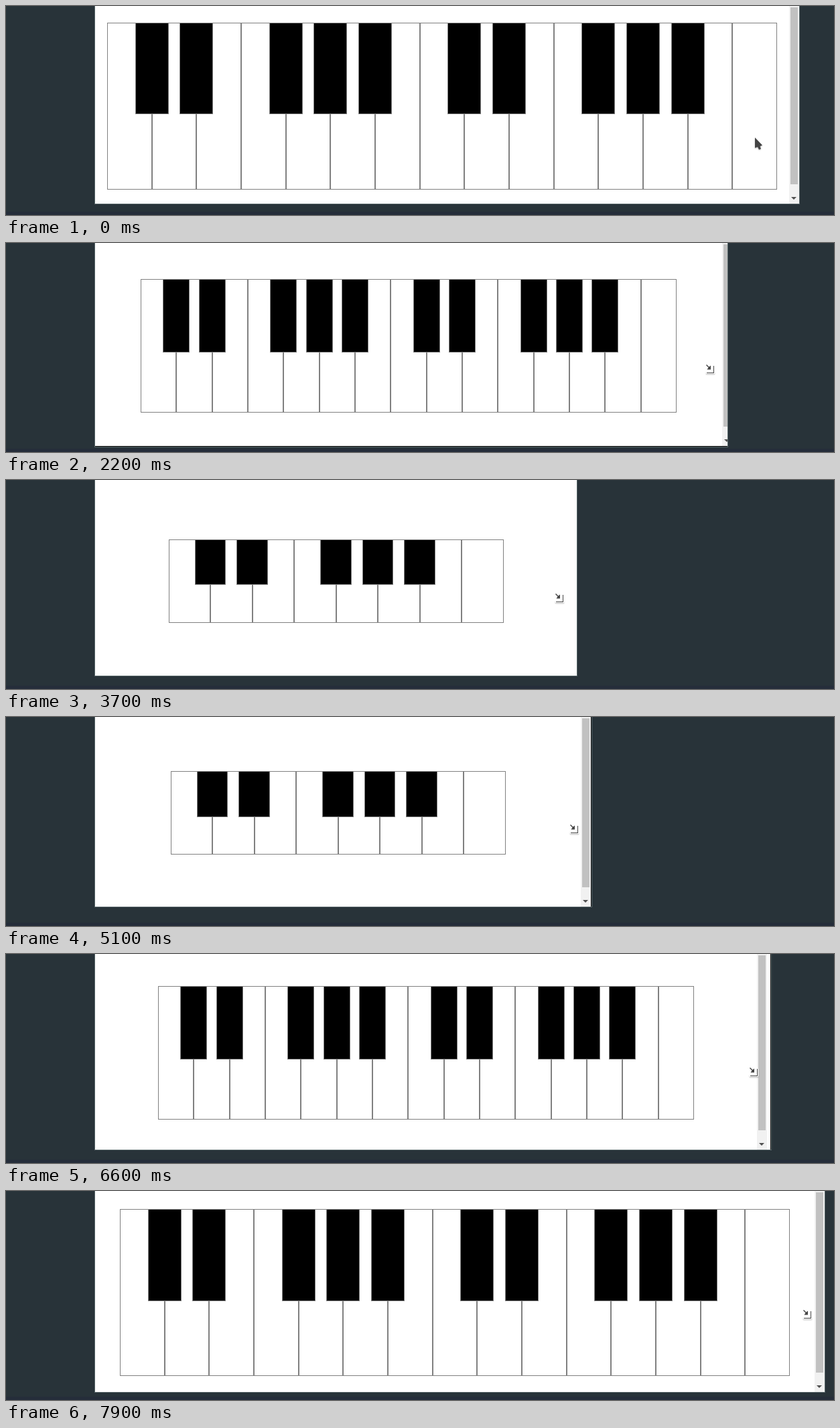
An HTML page with a canvas for the animation above (8000 ms loop, 1236 by 313 pixels).

```html
<!DOCTYPE html>
<html>
<head>
<meta charset="utf-8">
<title>Responsive piano</title>
<style>
html, body { margin: 0; width: 100%; height: 100%; overflow: hidden; background: #283339; }
canvas { display: block; }
</style>
</head>
<body>
<canvas id="stage" width="1236" height="313"></canvas>
<script>
const ctx = document.getElementById('stage').getContext('2d');
const LOOP = 8000, STEP = 100, REFLOW = 134, LEFT = 133, BAR = 15;

// Drag of the window corner: time, right, bottom
const drag = [
  [1290, 1184, 296], [2200, 1077, 305], [3000, 973, 303], [3600, 870, 300],
  [3700, 852, 293], [4100, 812, 290], [4500, 812, 290], [5100, 874, 284],
  [5400, 943, 285], [6030, 1038, 284], [6100, 1044, 284], [6960, 1213, 300],
  [7200, 1213, 300], [7400, 1224, 302], [7600, 1224, 302], [7700, 1222, 301]
];

// Pointer before the drag: time, x, y
const pointer = [[100, 1118, 197], [500, 1177, 195], [700, 1164, 187]];

function sample(track, t) {
  const i = track.findIndex(row => row[0] >= t);
  if (i <= 0) return track.at(i).slice(1);
  const [t0, ...from] = track[i - 1], [t1, ...to] = track[i];
  return from.map((v, j) => Math.round(v + (to[j] - v) * (t - t0) / (t1 - t0)));
}

function rect(color, x, y, w, h) {
  ctx.fillStyle = color;
  ctx.fillRect(x, y, w, h);
}

function polygon(color, points) {
  ctx.beginPath();
  points.forEach(([x, y]) => ctx.lineTo(x, y));
  ctx.closePath();
  ctx.fillStyle = color;
  ctx.fill();
}

function pianoKey(color, ...edges) {
  const [x0, x1, y0, y1] = edges.map(Math.round);
  rect('#808080', x0, y0, x1 - x0, y1 - y0);
  rect(color, x0 + 1, y0 + 1, x1 - x0 - 2, y1 - y0 - 2);
}

function piano(right, bottom) {
  const page = right - LEFT;
  const [width, keys] = page >= 1024 ? [1000, 15] : page >= 820 ? [800, 15] : [500, 8];
  const height = width / 4, step = width / keys;
  const x = (LEFT + right - BAR - width) / 2;
  const y = (bottom + 3 - height) / 2;
  for (let i = 0; i < keys; i++) {
    pianoKey('#fff', x + i * step, x + (i + 1) * step, y, y + height);
  }
  for (let i = 1; i < keys; i++) {
    if (i % 7 === 0 || i % 7 === 3) continue;
    const mid = x + i * step, half = step * 0.375;
    pianoKey('#000', mid - half, mid + half, y, y + height * 0.55);
  }
}

function scrollbar(right, bottom, hover) {
  const x = right - BAR;
  rect('#f1f1f1', x, 0, BAR, bottom);
  rect(hover ? '#a8a8a8' : '#c1c1c1', x + 2, 2, 11, bottom - 31);
  polygon('#505050', [[x + 3, bottom - 10], [x + 11, bottom - 10], [x + 7, bottom - 6]]);
}

function cursor(x, y, draw) {
  ctx.save();
  ctx.translate(x, y);
  ctx.shadowColor = 'rgba(0,0,0,.3)';
  ctx.shadowBlur = 2;
  ctx.shadowOffsetY = 1;
  draw();
  ctx.restore();
}

function arrow() {
  polygon('#444', [[0, 0], [0, 15.5], [4, 14], [6, 18], [9, 17], [7.5, 13], [11, 11.5]]);
}

function resizeCorner() {
  rect('#fff', 0, 11, 13, 3);
  ctx.shadowColor = 'transparent';
  rect('#fff', 10, 1, 3, 12);
  rect('#444', 1, 12, 11, 1);
  rect('#444', 11, 2, 1, 11);
  polygon('#444', [[0, 1], [1, 0], [4.5, 3.5], [7, 1.5], [7, 7.5], [1.5, 7.5], [3.5, 4.5]]);
}

function render(time) {
  const t = Math.floor(time % LOOP / STEP) * STEP;
  const [right, bottom] = sample(drag, t);
  // The page is laid out less often than the window is resized.
  const [pageRight, pageBottom] = sample(drag, Math.floor(t / REFLOW) * REFLOW);
  const [px, py] = sample(pointer, t);
  const hover = t < 700 && px >= 1149 && px < 1164;

  rect('#283339', 0, 0, 1236, 313);
  rect('#252d3a', 0, 308, 1236, 5);
  rect('#59676a', LEFT - 1, 0, right - LEFT + 2, bottom + 1);
  rect('#fff', LEFT, 0, right - LEFT, bottom);

  ctx.save();
  ctx.beginPath();
  ctx.rect(LEFT, 0, right - LEFT, bottom);
  ctx.clip();
  piano(pageRight, pageBottom);
  scrollbar(pageRight, pageBottom, hover);
  if (right > pageRight) rect('#000', right - 1, 0, 1, bottom);
  if (bottom > pageBottom) rect('#000', LEFT, bottom - 1, right - LEFT, 1);
  ctx.restore();

  if (t < 1100) cursor(px, py, arrow);
  else cursor(right - 32, bottom - 123, resizeCorner);
}

function loop() {
  render(performance.now());
  requestAnimationFrame(loop);
}
loop();
</script>
</body>
</html>
```
